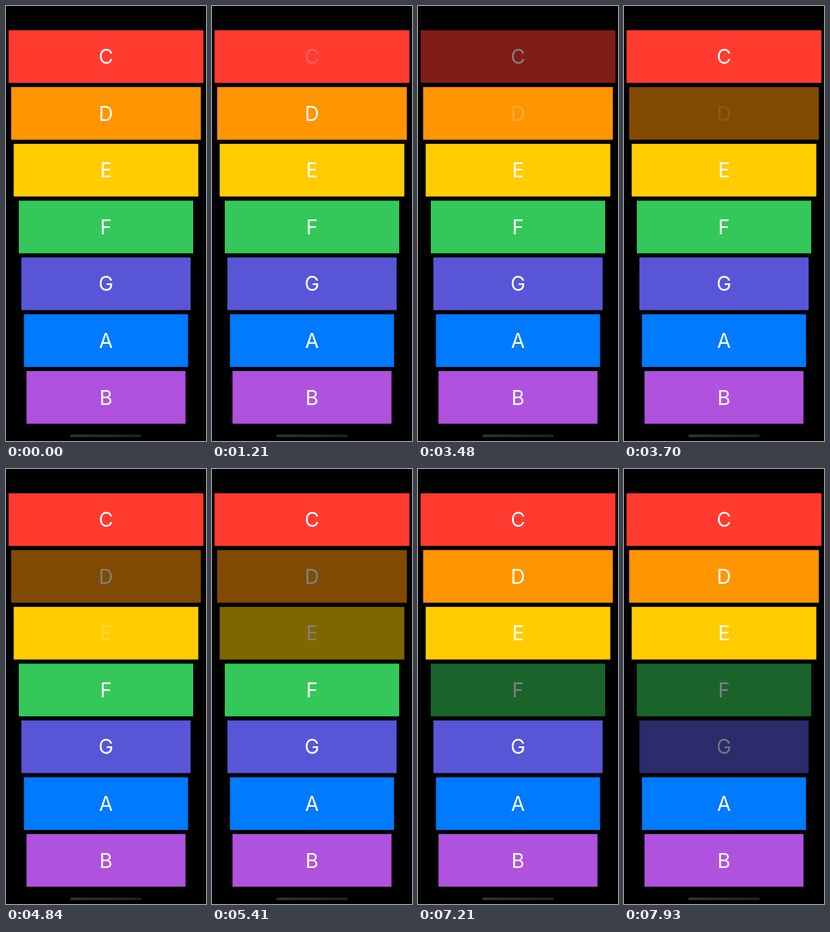
Animation, 296 px wide and 640 px high, one loop 8000 ms. Source, as an HTML page:

```html
<!DOCTYPE html>
<html lang="en">
<head>
<meta charset="utf-8">
<title>Xylophone</title>
<style>
  html, body { margin: 0; height: 100%; overflow: hidden; background: #000; }
  svg { display: block; width: 296px; height: 640px; }
  text { font: 400 29.5px Inter, "Liberation Sans", sans-serif; fill: #fff; text-anchor: middle; }
</style>
</head>
<body>
<svg viewBox="0 0 296 640">
  <defs>
    <linearGradient id="grip"><stop stop-color="#343434"/><stop offset="1" stop-color="#222"/></linearGradient>
  </defs>
  <g id="keys"></g>
  <rect x="95.2" y="630.5" width="105.6" height="3.8" rx="1.9" fill="url(#grip)"/>
</svg>
<script>
const LOOP = 8000, PT = 296 / 390;
const TOP = 47 * PT, PITCH = 83.57, HEIGHT = 77.5;

// press: label dims; release: key darkens and label fades back; restore: key lights up
const keys = [
  { name: 'C', color: '#ff3b30', inset: 5, press: 1210, release: 1470, faded: 1910, restore: 3700 },
  { name: 'D', color: '#ff9500', inset: 10, press: 3480, release: 3590, faded: 4030, restore: 5830 },
  { name: 'E', color: '#ffcc00', inset: 15, press: 4840, release: 4950, faded: 5410, restore: 7210 },
  { name: 'F', color: '#34c759', inset: 25, press: 6330, release: 6450, faded: 6890, restore: LOOP },
  { name: 'G', color: '#5856d6', inset: 30, press: 7450, release: 7600, faded: 8040, restore: LOOP },
  { name: 'A', color: '#007aff', inset: 35 },
  { name: 'B', color: '#af52de', inset: 40 },
];

function add(parent, tag, attrs) {
  const el = document.createElementNS('http://www.w3.org/2000/svg', tag);
  for (const k in attrs) el.setAttribute(k, attrs[k]);
  return parent.appendChild(el);
}

keys.forEach((key, i) => {
  const x = key.inset * PT, y = TOP + i * PITCH;
  key.group = add(document.getElementById('keys'), 'g', {});
  add(key.group, 'rect', { x, y, width: 296 - 2 * x, height: HEIGHT, fill: key.color });
  key.label = add(key.group, 'text', { x: 148, y: y + HEIGHT / 2 + 10.7 });
  key.label.textContent = key.name;
});

const ease = p => p * p * (3 - 2 * p);

function labelOpacity(key, t) {
  if (t < key.press) return 1;
  if (t < key.release) return 0.2;
  // the fade advances in four equal steps
  const step = Math.floor(4 * (t - key.release) / (key.faded - key.release) + 1e-6);
  return 0.2 + 0.8 * ease(Math.min(1, step / 4));
}

function draw(now) {
  const t = now % LOOP;
  for (const key of keys) {
    if (!key.press) continue;
    key.group.setAttribute('opacity', t >= key.release && t < key.restore ? 0.5 : 1);
    key.label.setAttribute('opacity', labelOpacity(key, t));
  }
  requestAnimationFrame(draw);
}
draw(0);
</script>
</body>
</html>
```
